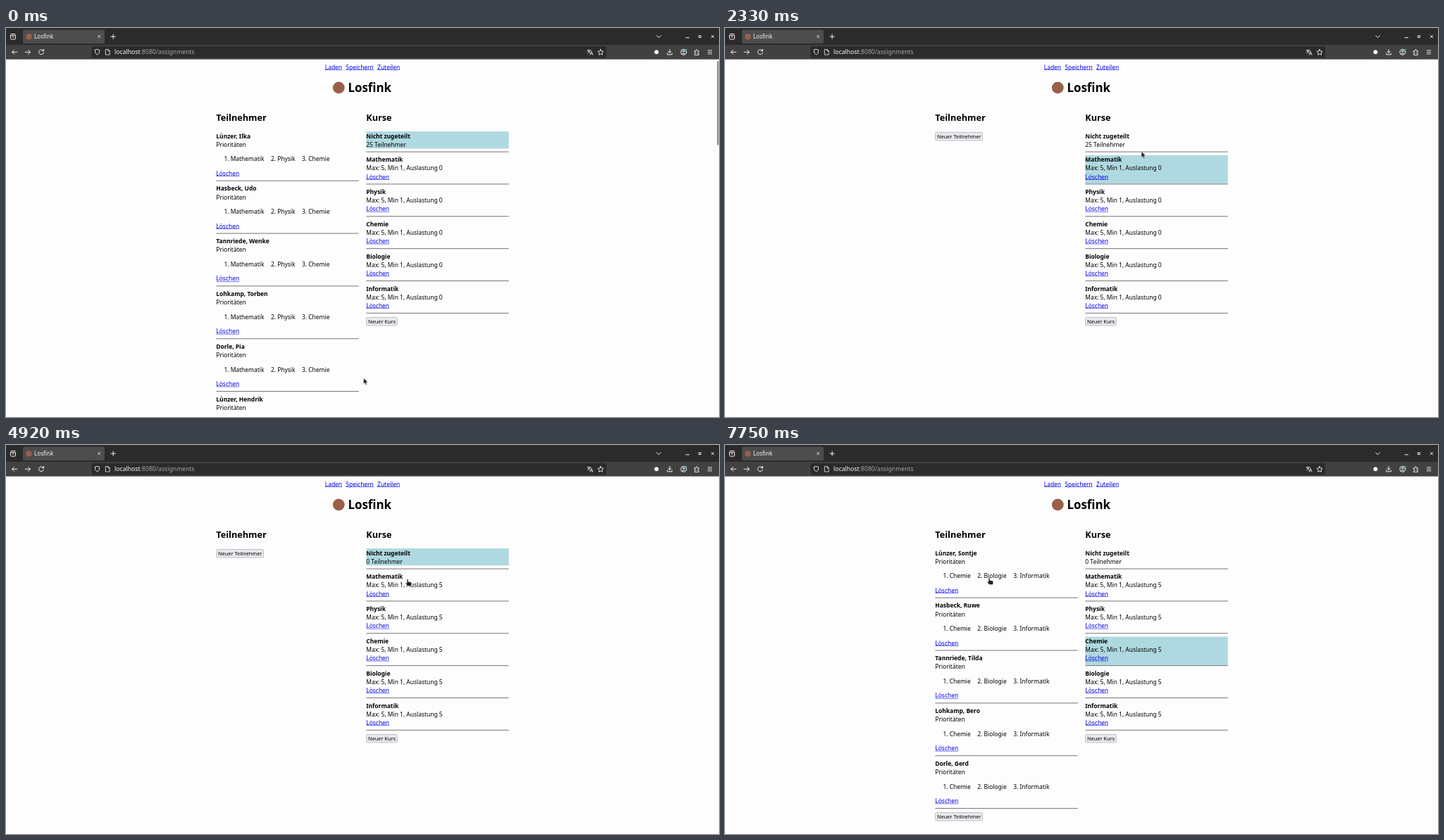
An HTML page that plays this animation: 1012x553 px, repeating every 8 s.

```html
<!DOCTYPE html>
<html lang="de">
<head>
<meta charset="utf-8">
<title>Losfink</title>
<style>
html, body { margin: 0; width: 100%; height: 100%; overflow: hidden; background: #fefdfe; }
body, text { font-family: "Noto Sans", "Open Sans", sans-serif; }
#page {
  position: absolute; left: 0; top: 0; width: 1920px; height: 1049px; overflow: hidden;
  transform: scale(.527083); transform-origin: 0 0;
  font-size: 16px; line-height: 23px; color: #000; white-space: nowrap;
}
#page > * { position: absolute; }
a { color: #0000e6; text-decoration: underline; }
nav { left: 0; width: 1920px; top: 94px; display: flex; justify-content: center; gap: 10px; }
h1, h2 { margin: 0; }
h1 { left: 921px; top: 139px; font-size: 32px; line-height: 44px; }
h2 { top: 225px; font-size: 24px; line-height: 33px; }
.logo { left: 880px; top: 145px; width: 32px; height: 32px; border-radius: 50%; background: #9a5f48; }
.left { left: 566px; }
.right { left: 970px; }
.col { top: 279px; width: 384px; }
.box, .person { box-sizing: border-box; padding-top: 1px; }
.box.on { background: #afd9e0; }
.course { height: 77px; }
.none { height: 46px; margin-bottom: 8px; }
.prio { display: flex; gap: 18px; margin: 16px 0 16px 21px; }
.line { height: 2px; background: #7c7c7c; margin-bottom: 8px; }
.person .line { margin-top: 7px; }
.button {
  display: inline-block; box-sizing: border-box; height: 23px; margin-top: 2px; padding: 0 4px;
  border: 1px solid #8f8f9d; border-radius: 4px; background: #e9e9ed; font-size: 14px; line-height: 21px;
}
.bar { left: 1915px; top: 89px; width: 4px; height: 227px; border-radius: 2px; background: #7e7e7e; }
svg { position: absolute; left: 0; top: 0; overflow: hidden; }
.icon { fill: none; stroke: #f2f2f2; stroke-width: 1; stroke-linecap: round; stroke-linejoin: round; }
</style>
</head>
<body>
<div id="page">
  <nav><a>Laden</a><a>Speichern</a><a>Zuteilen</a></nav>
  <div class="logo"></div>
  <h1>Losfink</h1>
  <h2 class="left">Teilnehmer</h2>
  <h2 class="right">Kurse</h2>
  <div class="right col" id="courses"></div>
  <div class="bar" id="bar"></div>
</div>

<svg width="1012" height="553" viewBox="0 0 1012 553">
  <rect width="1012" height="25" fill="#2c2b2c"/>
  <rect y="24" width="1012" height="20.600" fill="#424142"/>
  <rect x="24" y="2.5" width="116" height="19.5" rx="2.5" fill="#4e4d4e"/>
  <rect x="121.500" y="26" width="730.500" height="16.500" rx="2.500" fill="#2c2b2c"/>
  <circle cx="32.5" cy="12.200" r="4.2" fill="#9a5f48"/>
  <text x="40" y="15" font-size="8.1" fill="#f6f6f6">Losfink</text>
  <text x="154" y="37.2" font-size="8.69" fill="#f8f8f8">localhost<tspan fill="#a5a5a5">:8080/assignments</tspan></text>
  <g class="icon">
    <path d="M6.500 10.500h7v4.500q0 1-1 1h-5q-1 0-1-1zM7 8.500h6M9 12.500h2"/>
    <path d="M130.500 10.400l3.400 3.400m0-3.400l-3.400 3.400" stroke-width=".8"/>
    <path d="M149 12.200h6.200m-3.100-3.100v6.200"/>
    <path d="M923.500 10.800l3 2.800 3-2.800"/>
    <path d="M965 13.800h4.500"/>
    <rect x="983.700" y="10.900" width="2.600" height="2.600"/>
    <path d="M1001.300 10.500l3.400 3.400m0-3.400l-3.400 3.400"/>
    <path d="M15.800 34.300h-7.300m3-3l-3 3 3 3"/>
    <path d="M27.200 34.300h7.300m-3-3l3 3-3 3"/>
    <path d="M53 32.200a3.500 3.500 0 1 0 .5 2.800M53.500 30.300v2.300h-2.300"/>
    <path d="M129.500 30.300l3.300 1.100q.2 5-3.300 6.800q-3.500-1.800-3.300-6.800z" stroke-width=".9"/>
    <path d="M141.700 30.500h3.300l2.200 2.200v5.300h-5.500zM145 30.500v2.200h2.200" stroke-width=".8"/>
    <path d="M825 32h5.200m-2.600-1.400v1.400m1.700 0q-1 2.700-4 3.900m.5-3.900q1 2.200 3 3.200M829 38.300l2-5 2 5m-3.300-1.600h2.600" stroke-width=".8"/>
    <path d="M844 30.300l1.200 2.600 2.900.4-2.100 2 .5 2.900-2.500-1.400-2.500 1.400.5-2.900-2.100-2 2.900-.4z" stroke-width=".9"/>
    <path d="M942 30.500v4.800m-2.200-2.200l2.200 2.200 2.200-2.200M938.700 36v1.800h6.600v-1.800"/>
    <circle cx="961.800" cy="34.300" r="4"/>
    <circle cx="961.800" cy="33" r="1.200"/>
    <path d="M959.600 36.800q2.200-2.200 4.400 0"/>
    <path d="M977.500 32.600h1.800q-.4-2 1-2t1 2h2v2q-1.700-.4-1.700 1t1.700 1v1.800h-5.800v-1.900q1.700.2 1.700-1t-1.700-1z" stroke-width=".9"/>
    <path d="M996.300 31.800h5.400m-5.400 2.500h5.400m-5.400 2.500h5.400" stroke-width=".9"/>
  </g>
  <circle cx="923.300" cy="34.300" r="3" fill="#f2f2f2"/>
  <circle cx="965" cy="31.300" r="1.500" fill="#37b5c9"/>
  <g id="cursor" fill="#222" stroke="#fff" stroke-width=".5" stroke-linejoin="round">
    <path id="arrow" d="M0 0v8.700l2-1.800 1.400 3 1.500-.7-1.400-2.900 2.700-.2z"/>
    <path id="hand" d="M-1 .7q1-1.400 1.900 0v3l3.700.8q1.400.4 1.300 2l-.7 3.500h-5.200l-2.800-3.500q-.5-1.400.8-1.200l1 .8z"/>
  </g>
</svg>

<script>
const $ = id => document.getElementById(id);
const SCALE = .527083, LOOP = 8000, FRAME = 1000 / 12;
const subjects = ["Mathematik", "Physik", "Chemie", "Biologie", "Informatik"];
const surnames = ["Lünzer", "Hasbeck", "Tannriede", "Lohkamp", "Dorle"];
const groups = ["Ilka Udo Wenke Torben Pia", "Hendrik Rosa Veit Levinia Arne", "Sontje Ruwe Tilda Bero Gerd"]
  .map(names => names.split(" "));

const line = '<div class="line"></div>';
const button = label => `<div class="button">${label}</div>`;
const person = (group, i) => `<div class="person"><b>${surnames[i]}, ${groups[group][i]}</b><br>Prioritäten
  <div class="prio">${[0, 1, 2].map(n => `<span>${n + 1}. ${subjects[group + n]}</span>`).join("")}</div>
  <a>Löschen</a>${line}</div>`;
const people = group => surnames.map((_, i) => person(group, i)).join("");

function addList(html) {
  const el = document.createElement("div");
  el.className = "left col";
  el.innerHTML = html;
  $("page").append(el);
  return el;
}
const newPerson = button("Neuer Teilnehmer");
const lists = {
  all: addList(people(0) + person(1, 0)),
  empty: addList(newPerson),
  group0: addList(people(0) + newPerson),
  group1: addList(people(1) + newPerson),
  group2: addList(people(2) + newPerson)
};

$("courses").innerHTML =
  `<div class="box none"><b>Nicht zugeteilt</b><br><span id="free"></span> Teilnehmer</div>${line}` +
  subjects.map(s => `<div class="box course"><b>${s}</b><br>Max: 5, Min 1, Auslastung <span class="load"></span><br><a>Löschen</a></div>${line}`).join("") +
  button("Neuer Kurs");
const boxes = [...document.querySelectorAll(".box")];
const loads = [...document.querySelectorAll(".load")];

// start time, visible list, selected box, assigned
const states = [
  [0, "all", 0, false],
  [1910, "empty", 1, false],
  [2825, "all", 0, false],
  [4160, "empty", 0, true],
  [5245, "group0", 1, true],
  [6080, "group1", 2, true],
  [7080, "group2", 3, true]
];

// time, x, y of the pointer
const path = [
  [0, 507.5, 497.5], [1667, 591.5, 198],
  [1917, 591.5, 198], [2333, 591, 175.5], [2667, 590, 162],
  [2833, 590, 162], [3417, 546, 48], [3583, 544, 48.5], [3750, 544, 50], [3917, 543.5, 51],
  [4250, 543.5, 51], [4667, 576, 212], [4917, 570, 190.5],
  [5250, 570, 190.5], [6000, 561, 246],
  [6167, 561, 246], [6333, 561, 258], [6583, 559.5, 284.5], [6833, 559, 291],
  [7083, 559, 291], [7750, 375, 188.5], [LOOP, 375, 188.5]
];

function pointerAt(t) {
  const i = path.findIndex((p, n) => n && t <= p[0]);
  const [t0, x0, y0] = path[i - 1], [t1, x1, y1] = path[i];
  const k = (t - t0) / (t1 - t0), e = k * k * (3 - 2 * k);
  return [x0 + (x1 - x0) * e, y0 + (y1 - y0) * e];
}

function clickable(x, y, list) {
  const px = x / SCALE, py = y / SCALE;
  if (x > 527 && x < 559 && y > 50 && y < 62) return true;
  if (px > 970 && px < 1354) {
    return (py > 279 && py < 325) || (py > 343 && py < 778 && (py - 343) % 87 < 77);
  }
  return list !== "empty" && px > 566 && px < 950 && py > 279 && py < 989 && (py - 279) % 142 < 124;
}

function draw(now) {
  const t = Math.floor(((now % LOOP) + 5) / FRAME) * FRAME % LOOP;
  const [, list, selected, assigned] = states.filter(s => s[0] <= t + 1).pop();
  for (const name in lists) lists[name].style.display = name === list ? "" : "none";
  boxes.forEach((box, i) => box.classList.toggle("on", i === selected));
  loads.forEach(el => el.textContent = assigned ? 5 : 0);
  $("free").textContent = assigned ? 0 : 25;
  $("bar").style.display = list === "all" ? "" : "none";

  const [x, y] = pointerAt(t), hand = clickable(x, y, list);
  $("cursor").setAttribute("transform", `translate(${x} ${y})`);
  $("hand").style.display = hand ? "" : "none";
  $("arrow").style.display = hand ? "none" : "";
}

let start;
function tick(now) {
  start ??= now;
  draw(now - start);
  requestAnimationFrame(tick);
}
draw(0);
requestAnimationFrame(tick);
</script>
</body>
</html>
```
